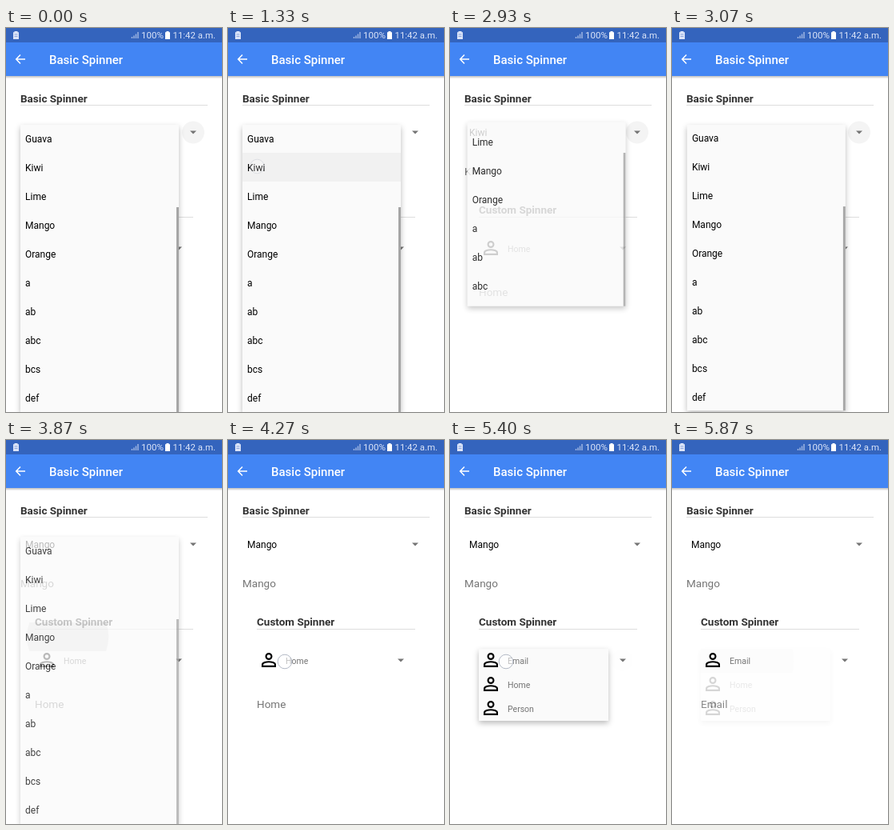
Recreate the animation shown at these times as an HTML page. Size 270 by 480 pixels, loop 5.94 s.

```html
<!DOCTYPE html>
<html lang="en">
<head>
<meta charset="utf-8">
<title>Basic Spinner</title>
<style>
  html, body { margin: 0; height: 100%; overflow: hidden; background: #fff; }
  #stage { display: block; width: 100vw; height: 100vh; font-family: Roboto, sans-serif; }
  .shadow { filter: blur(3.5px); }
</style>
</head>
<body>
<svg id="stage" viewBox="0 0 270 480"></svg>
<script>
const LOOP = 5940, OPEN_MS = 250, CLOSE_MS = 120;
const clamp = v => Math.max(0, Math.min(1, v));
const $ = id => document.getElementById(id);
const set = (el, attrs) => { for (const k in attrs) el.setAttribute(k, attrs[k]); };

// Markup helpers
const text = (x, y, s, size, fill, extra = '') =>
  `<text x="${x}" y="${y}" font-size="${size}" fill="${fill}" ${extra}>${s}</text>`;
const rect = (x, y, w, h, fill, extra = '') =>
  `<rect x="${x}" y="${y}" width="${w}" height="${h}" fill="${fill}" ${extra}/>`;
const person = (cx, cy) =>
  `<g transform="translate(${cx} ${cy}) scale(1.125)" fill="none" stroke="#000" stroke-width="1.9">
    <circle cy="-4" r="3.05"/>
    <path d="M-7.05 7.05V5C-7.05 3-2.7 1.95 0 1.95S7.05 3 7.05 5V7.05Z"/></g>`;
const arrow = (x, y) => `<path d="M${x - 4} ${y - 2}h8l-4 4z" fill="#757575"/>`;
const popup = (id, content) =>
  `<g id="${id}"><rect class="shadow" fill="#000" fill-opacity=".27"/>
    <svg class="sheet">${rect(0, 0, 270, 480, '#fafafa')}
      <svg class="row"><circle fill="#000" fill-opacity=".035"/></svg>${content}</svg></g>`;

const fruits = ['Guava', 'Kiwi', 'Lime', 'Mango', 'Orange', 'a', 'ab', 'abc', 'bcs', 'def'];
const places = ['Email', 'Home', 'Person'];
const white = '#fff', pale = '#dbe4f8', grey = '#757575', dark = '#333';

$('stage').innerHTML = `
  <defs><linearGradient id="fall" x2="0" y2="1">
    <stop stop-opacity=".25"/><stop offset="1" stop-opacity="0"/></linearGradient></defs>
  ${rect(0, 0, 270, 480, white)}
  ${rect(0, 60, 270, 3.5, 'url(#fall)')}
  ${rect(0, 18, 270, 42, '#4285f4')}
  ${rect(0, 0, 270, 18, '#3464bd')}
  <path d="M10.5 4h4v1.2H16V14H9V5.2h1.5z" fill="${pale}"/>
  <path d="M10.5 8h4M10.5 10.5h4" stroke="#8ca6dc"/>
  <path d="M157.5 13v-2M160 13V9.5M162.500 13V7.500M165 13V5" stroke="#9db4e2" stroke-width="1.5"/>
  ${text(169, 13.2, '100%', 11.6, pale)}
  <path d="M200.500 4h3v1.200H205V14h-6V5.200h1.500z" fill="#fff"/>
  ${text(208.500, 13.2, '11:42 a.m.', 11.4, pale)}
  <path d="M24 39H13.500M18 33.500L12.700 39L18 44.500" fill="none" stroke="#fff" stroke-width="1.5"/>
  ${text(54, 45.2, 'Basic Spinner', 15, white, 'font-weight="500"')}

  ${text(18, 92.7, 'Basic Spinner', 13.5, dark, 'font-weight="700"')}
  ${rect(18, 96, 234, 1, '#ddd')}
  ${text(36, 231.8, 'Custom Spinner', 13.5, dark, 'font-weight="700"')}
  ${rect(36, 236, 198, 1, '#ddd')}
  <circle id="ringA" cx="234" cy="130.500" r="14"/>
  <circle id="ringB" cx="215" cy="275.500" r="14"/>
  ${arrow(234, 130.5)}${arrow(216, 275.5)}
  ${text(24, 134.7, '', 12, '#000', 'id="fruit"')}
  ${text(18, 184, '', 13.5, grey, 'id="fruitEcho"')}
  ${person(51, 275)}
  ${text(72, 279.8, '', 10.5, grey, 'id="place"')}
  ${text(36, 335.2, '', 13.5, grey, 'id="placeEcho"')}

  ${popup('listA', fruits.map((s, i) => text(24, 142.7 + 36 * i, s, 12, '#000')).join('')
    + rect(213, 224, 3, 256, '#a6a6a6'))}
  ${popup('listB', places.map((s, i) => person(51, 275 + 30 * i)
    + text(72, 279.8 + 30 * i, s, 10.5, grey)).join(''))}
  <circle id="touch" r="8.800" fill="#fff" fill-opacity=".55" stroke="#b4bac6" stroke-width="1"/>`;

// Resting box, anchor row, open/close times and row ripples of each list
const lists = [
  { id: 'listA', x: 18, y: 121, w: 198, h: 359, mid: 130, rowH: 36,
    shows: [[-1000, 1570], [2865, 3840]],
    ripples: [{ x: 37, y: 174, at: 1200, ms: 130 }, { x: 60, y: 246, at: 3600, ms: 900 }] },
  { id: 'listB', x: 36, y: 261, w: 162, h: 90, mid: 276, rowH: 30,
    shows: [[4765, 5770]],
    ripples: [{ x: 70, y: 276, at: 5530, ms: 900 }] },
];

// x, y, finger down, finger up
const touches = [
  [36.5, 173, 1000, 1200], [39.5, 136, 2400, 2530], [60, 246, 3470, 3600],
  [71, 277, 4270, 4470], [70, 277, 5400, 5530],
];

function drawList(o, t) {
  const g = $(o.id), show = o.shows.find(([a, b]) => t >= a && t < b + CLOSE_MS);
  g.style.display = show ? '' : 'none';
  if (!show) return;
  const [open, close] = show;
  set(g, { opacity: clamp((t - open) / 80) * clamp((close + CLOSE_MS - t) / CLOSE_MS) });

  // The sheet slides out of its anchor while its clip grows
  const rest = 1 - clamp((t - open) / OPEN_MS), f = rest ** 3;
  const dx = 5 * rest, dy = (o.mid - o.y - o.h / 2) * f, inset = (o.h - o.rowH) / 2 * f;
  const box = { x: o.x + dx, y: o.y + dy + inset, width: o.w, height: o.h - 2 * inset };
  set(g.querySelector('.shadow'), { ...box, y: box.y + 3 });
  set(g.querySelector('.sheet'),
    { ...box, viewBox: `${o.x} ${o.y + inset} ${box.width} ${box.height}` });

  const r = o.ripples.find(r => r.at >= open && r.at < close);
  const p = r ? clamp((t - r.at) / r.ms) : 0, row = g.querySelector('.row');
  if (r) set(row, { x: o.x, y: r.y - o.rowH / 2, width: o.w, height: o.rowH });
  set(row.firstChild, {
    r: 170 * p, cy: o.rowH / 2,
    cx: r ? r.x - o.x + (o.x + o.w / 2 - r.x) * p : 0,
  });
}

const pulse = (t, on, off, fade) => clamp((t - on) / 120) * clamp((off + fade - t) / fade);

function draw(t) {
  $('fruit').textContent = $('fruitEcho').textContent = t < 3740 ? 'Kiwi' : 'Mango';
  $('place').textContent = $('placeEcho').textContent = t < 5700 ? 'Home' : 'Email';
  set($('ringA'), { 'fill-opacity': .045 * Math.max(pulse(t, -999, 0, 470), pulse(t, 2780, 3130, 370)) });
  set($('ringB'), { 'fill-opacity': .045 * pulse(t, 4640, 5050, 370) });
  lists.forEach(o => drawList(o, t));

  const hit = touches.find(([, , down, up]) => t >= down && t < up + 200);
  set($('touch'), hit
    ? { cx: hit[0], cy: hit[1], opacity: clamp((hit[3] + 200 - t) / 200) }
    : { opacity: 0 });
}

const start = performance.now();
function tick() {
  draw((performance.now() - start) % LOOP);
  requestAnimationFrame(tick);
}
tick();
</script>
</body>
</html>
```
